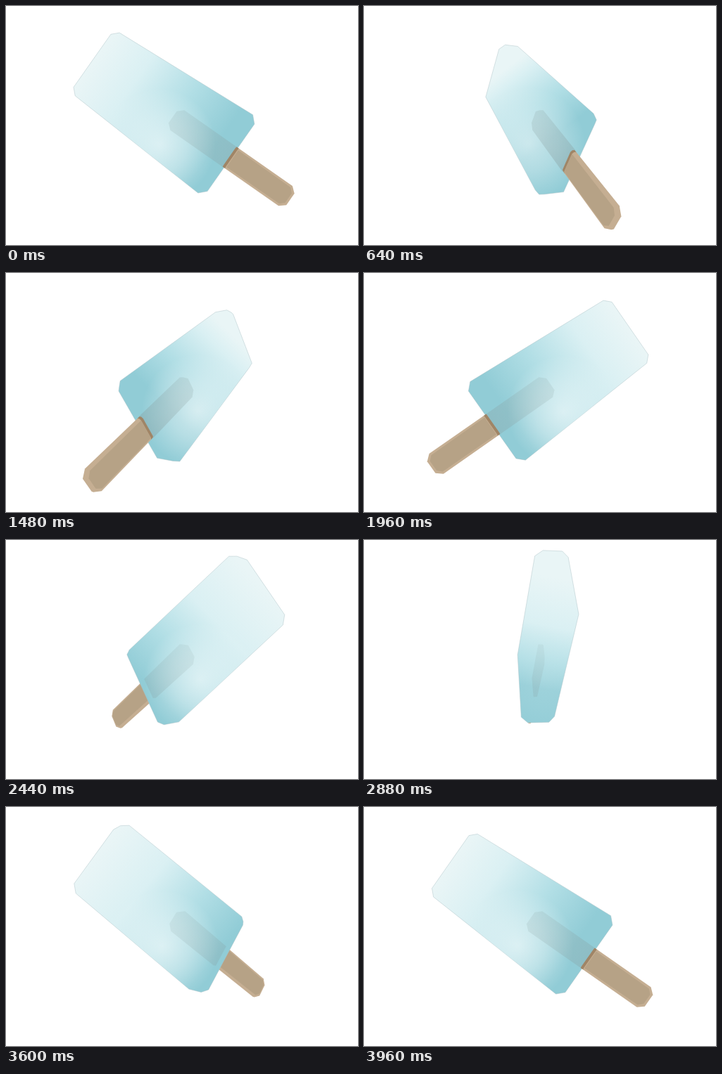
Recreate the animation shown at these times as an HTML page. Size 500 px wide and 340 px high, loop 4 s.

```html
<!DOCTYPE html>
<html lang="en">
<head>
<meta charset="utf-8">
<title>Spinning ice pop</title>
<style>
html, body { margin: 0; width: 100%; height: 100%; overflow: hidden; background: #fff; }
svg { display: block; width: 100vw; height: 100vh; }
</style>
</head>
<body>
<svg viewBox="0 0 500 340">
  <defs>
    <linearGradient id="tint" gradientUnits="userSpaceOnUse">
      <stop offset="0" stop-color="#e9f5f6"/>
      <stop stop-color="#daf0f3"/>
      <stop stop-color="#b1dee5"/>
      <stop offset="1" stop-color="#91ccd6"/>
    </linearGradient>
    <radialGradient id="frost" gradientUnits="userSpaceOnUse">
      <stop offset="0" stop-color="#f2fafb" stop-opacity=".66"/>
      <stop offset=".5" stop-color="#f2fafb" stop-opacity=".38"/>
      <stop offset="1" stop-color="#f2fafb" stop-opacity="0"/>
    </radialGradient>
    <linearGradient id="core" gradientUnits="userSpaceOnUse">
      <stop offset="0" stop-color="#92aaaa" stop-opacity=".26"/>
      <stop offset="1" stop-color="#86999a" stop-opacity=".38"/>
    </linearGradient>
  </defs>
  <g id="behind"></g>
  <path id="ice" fill="url(#tint)" stroke="#a9bfc3" stroke-opacity=".65" stroke-width=".7"/>
  <path id="sheen" fill="url(#frost)"/>
  <path id="inner" fill="url(#core)"/>
  <g id="front"></g>
  <g id="stick">
    <path id="joint" fill="#a08566"/>
    <path id="wood" fill="#c5ae92"/>
    <path id="face" fill="#b6a286"/>
  </g>
</svg>
<script>
const el = id => document.getElementById(id);
const set = (node, attrs) => { for (const k in attrs) node.setAttribute(k, attrs[k]); };

const CX = 250.7, CY = 167.7, DIST = 540;
const STEP = 40, FRAMES = 100, RAD = Math.PI / 180;
const TURN = 3.645 * RAD, PHASE = -0.6 * RAD;
const TILT = 35 * RAD, ct = Math.cos(TILT), st = Math.sin(TILT);
let cos = 1, sin = 0;

// a: along the pop, b: across it, w: through its thickness
function project([a, b, w = 0]) {
  const u = a * ct + b * st, v = a * st - b * ct;
  const k = DIST / (DIST - u * sin - w * cos);
  return [CX + (u * cos - w * sin) * k, CY + v * k];
}

function hull(points) {
  const p = points.slice().sort((m, n) => m[0] - n[0] || m[1] - n[1]);
  const half = list => {
    const h = [];
    for (const q of list) {
      while (h.length > 1) {
        const [o, r] = h.slice(-2);
        if ((r[0] - o[0]) * (q[1] - o[1]) - (r[1] - o[1]) * (q[0] - o[0]) > 0) break;
        h.pop();
      }
      h.push(q);
    }
    return h.slice(0, -1);
  };
  return half(p).concat(half(p.reverse()));
}

const outline = pts =>
  "M" + hull(pts.map(project)).map(p => p[0].toFixed(2) + " " + p[1].toFixed(2)).join("L") + "Z";

// Mirror one corner over b and w
const mirror = pts => pts.flatMap(([a, b, w]) =>
  [[a, b, w], [a, -b, w], [a, b, -w], [a, -b, -w]]);

const chamfer = (a, dir, b, h, c) =>
  [[a, b - c, h - c], [a - dir * c, b, h - c], [a - dir * c, b - c, h]];

const iceBody = mirror([...chamfer(81.5, 1, 66, 25, 9.3), ...chamfer(-153, -1, 53.5, 20, 8.6)]);

const EXIT = 82, BARE = 86, END = 187, THICK = 3.6;
const section = a => [[a, 17.3, 1.8], [a, 14.5, THICK]];
const woodBody = mirror([
  ...section(BARE), [END - 8.5, 17.3, 1.8], [END, 10, 1.8],
  [END - 10, 14, THICK], [END - 4, 8, THICK]
]);
const jointBody = mirror([...section(EXIT), ...section(BARE)]);
const coreBody = mirror([[-17, 10, 3], [-9, 17.3, 3], [EXIT, 17.3, 3]]);

function along(id, from, to) {
  const [x1, y1] = project([from, 0]), [x2, y2] = project([to, 0]);
  set(el(id), { x1, y1, x2, y2 });
}

function draw(frame) {
  cos = Math.cos(frame * TURN + PHASE);
  sin = Math.sin(frame * TURN + PHASE);

  const body = outline(iceBody);
  set(el("ice"), { d: body });
  set(el("sheen"), { d: body, opacity: Math.min(1, 1.6 * Math.abs(cos)) });
  set(el("inner"), { d: outline(coreBody), opacity: 0.75 + 0.25 * sin });

  along("tint", -153, 82);
  along("core", -17, EXIT);
  const mid = 0.47 - 0.17 * sin;
  const stops = el("tint").children;
  set(stops[1], { offset: mid - 0.2 });
  set(stops[2], { offset: mid + 0.12 });
  set(stops[3], { offset: Math.min(1, mid + 0.42) });

  const [cx, cy] = project([-10, -43]);
  set(el("frost"), { cx, cy, r: 80 });

  // The broad side of the stick that looks at the viewer
  const side = DIST * Math.abs(cos) > THICK ? THICK * Math.sign(cos) : 0;
  const flat = [[BARE, 14.5], [END - 10, 14], [END - 4, 8]]
    .flatMap(([a, b]) => [[a, b, side], [a, -b, side]]);
  set(el("joint"), { d: outline(jointBody) });
  set(el("wood"), { d: outline(woodBody) });
  set(el("face"), { d: side ? outline(flat) : "" });
  el(sin > -0.03 ? "front" : "behind").append(el("stick"));
}

const start = performance.now();
function tick() {
  draw(Math.floor((performance.now() - start) / STEP) % FRAMES);
  requestAnimationFrame(tick);
}
tick();
</script>
</body>
</html>
```
